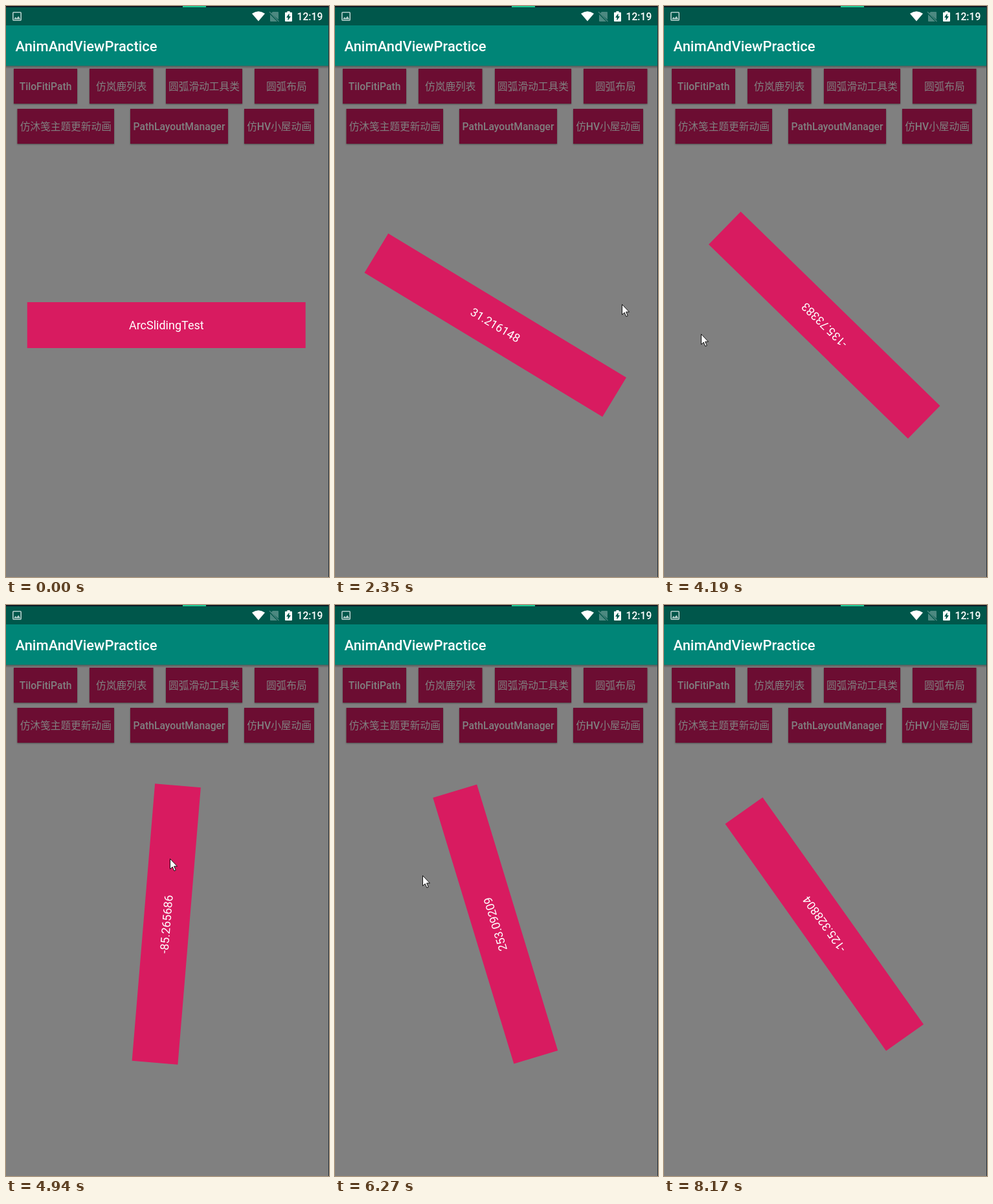
An HTML page that plays this animation: 499 by 883 pixels, repeating every 8.39 s.

```html
<!DOCTYPE html>
<html lang="zh">
<head>
<meta charset="utf-8">
<style>
html, body { margin: 0; width: 100%; height: 100%; overflow: hidden; background: #808080; }
svg { display: block; width: 499px; height: 883px; font-family: Roboto, "Noto Sans CJK SC", "Noto Sans CJK", sans-serif; }
.medium { font-weight: 500; }
#buttons text { font-size: 15.7px; fill: #808080; text-anchor: middle; }
</style>
</head>
<body>
<svg viewBox="0 0 499 883">
  <defs>
    <linearGradient id="fade" x2="0" y2="1">
      <stop stop-color="#000" stop-opacity=".34"/>
      <stop offset="1" stop-color="#000" stop-opacity="0"/>
    </linearGradient>
    <filter id="soft" x="-10%" y="-10%" width="120%" height="125%">
      <feDropShadow dx="0" dy="1" stdDeviation="1" flood-opacity=".4"/>
    </filter>
  </defs>
  <rect width="499" height="883" fill="#808080"/>
  <rect y="92" width="498" height="5" fill="url(#fade)"/>
  <rect y="30" width="498" height="62.5" fill="#008577"/>
  <rect width="498" height="30" fill="#00574b"/>
  <rect width="499" height="2" fill="#0c1a24"/>
  <rect x="273" width="36" height="2" fill="#1fc994"/>
  <rect x="498" width="1" height="883" fill="#26313a"/>

  <g fill="#b5cfcb">
    <rect x="10.8" y="9.8" width="12.4" height="12.4" rx="1.2" fill="none" stroke="#b5cfcb" stroke-width="1.6"/>
    <path d="M12 20.5l2.6-3.6 2 2.2 2.6-3.4 3.1 4.8z"/>
  </g>
  <path d="M390 23.5L380 11.8Q390 4.5 400 11.8Z" fill="#fff"/>
  <g fill="#4d8981">
    <path d="M412 9h8q1 0 1 1v11L409.500 11.500zM408 13l11 11h-10q-1 0-1-1z"/>
    <path d="M407 9l14.500 15" stroke="#4d8981" stroke-width="1.300"/>
  </g>
  <path d="M434.500 8h4v1.800h2.500q1 0 1 1V23q0 1-1 1h-9q-1 0-1-1V10.800q0-1 1-1h2.500z" fill="#fff"/>
  <path d="M437.500 11.500v4.500h2.500l-4.500 6.500v-4.800H433z" fill="#00574b"/>
  <text class="medium" x="449.500" y="21.800" font-size="15.700" fill="#fff">12:19</text>
  <text class="medium" x="14.500" y="70" font-size="22" fill="#fff">AnimAndViewPractice</text>

  <g id="buttons"></g>

  <g id="bar">
    <rect x="-215" y="-35.500" width="430" height="71" fill="#d81b60"/>
    <text id="label" y="6.300" font-size="18" fill="#fff" text-anchor="middle"></text>
  </g>
  <path id="cursor" d="M.5.5v15.800l3.700-3.300 2.700 6.200 2.400-1.100-2.700-6h4.900z" fill="#fff" stroke="#111" stroke-width="1"/>
</svg>
<script>
const LOOP = 8390, HIDE = 8170;
const $ = id => document.getElementById(id);

// x, y, width, label
const buttons = [
  [12, 97, 98, 'TiloFitiPath'], [129, 97, 98.5, '仿岚鹿列表'],
  [247, 97, 118, '圆弧滑动工具类'], [384, 97, 98.5, '圆弧布局'],
  [17.5, 159, 149.500, '仿沐笺主题更新动画'], [192, 159, 151, 'PathLayoutManager'],
  [368, 159, 108, '仿HV小屋动画']
];
$('buttons').innerHTML = buttons.map(([x, y, w, name]) => {
  const text = name.replace(/[A-Za-z]+/g, '<tspan class="medium">$&</tspan>');
  return `<rect x="${x}" y="${y}" width="${w}" height="54" fill="#6c0e30" filter="url(#soft)"/>
    <text x="${x + w / 2}" y="${y + 33}">${text}</text>`;
}).join('');

// Spans of screen updates: start, end, number of steps
const spans = [
  [370, 1200, 15], [1250, 2070, 15], [2130, 2640, 10], [2820, 3620, 15], [3680, 4480, 15],
  [4530, 5350, 15], [5400, 6210, 14], [6270, 6270, 1], [6510, 7320, 15], [7380, 8170, 15]
];

// time, bar angle
const turn = [
  [1200, 0], [1600, -39.358925], [1830, -45], [2070, -30], [2640, 78], [2820, 79],
  [3000, 98], [3220, 72.57853], [3620, -66], [4190, -135.73383], [4480, -168],
  [4940, -85.265686], [5350, 97], [5400, 107], [6270, 253.09209], [6450, 253.09209],
  [7320, -107], [7600, -129], [7740, -125.328804]
];

// time, pointer angle and distance from the centre
const pointer = [
  [370, -158.5, 41], [700, -70.5, 150], [1200, -39.4, 197], [1600, -78.8, 241.6],
  [1830, -84, 256], [2070, -70, 240], [2640, 50, 170], [2820, 62, 190], [3000, 88, 271],
  [3220, 63.6, 186], [3620, -84, 237], [3720, -102, 252], [4190, -183.9, 191.4],
  [4480, -215, 190], [4940, -87.2, 102.1], [5350, 90, 259], [5400, 97, 261],
  [5800, 160, 200], [6210, 213.6, 135.6], [6450, 213.6, 135.6], [7320, -130, 140],
  [7740, -165, 150], [7900, -235, 160], [8170, -298, 461]
];

function snap(t) {
  let out = 0;
  for (const [start, end, n] of spans) {
    if (t < start) break;
    const step = (end - start) / (n - 1) || 1;
    const k = Math.min(n - 1, Math.floor((t - start) / step + 0.1));
    out = Math.round((start + k * step) / 10) * 10;
  }
  return out;
}

// Smooth curve through the keys without overshoot
function curve(keys, t, c = 1) {
  const last = keys.length - 1;
  if (t <= keys[0][0]) return keys[0][c];
  if (t >= keys[last][0]) return keys[last][c];
  const i = keys.findIndex(k => k[0] > t) - 1;
  const slope = j => j < 0 || j >= last ? 0 : (keys[j + 1][c] - keys[j][c]) / (keys[j + 1][0] - keys[j][0]);
  const tangent = j => {
    const a = slope(j - 1), b = slope(j);
    return a * b > 0 ? 2 * a * b / (a + b) : 0;
  };
  const h = keys[i + 1][0] - keys[i][0], u = (t - keys[i][0]) / h, v = 1 - u;
  return v * v * (1 + 2 * u) * keys[i][c] + u * u * (3 - 2 * u) * keys[i + 1][c]
    + h * u * v * (v * tangent(i) - u * tangent(i + 1));
}

// Shortest decimal form of a 32-bit float
function floatText(x) {
  for (let p = 6; p < 9; p++) {
    const short = +x.toPrecision(p);
    if (Math.fround(short) === Math.fround(x)) return String(short);
  }
  return String(+x.toPrecision(9));
}

function draw(now) {
  const t = snap(now % LOOP), angle = curve(turn, t);
  $('bar').setAttribute('transform', `translate(247.75 493.5) rotate(${angle})`);
  $('label').textContent = t < 1250 ? 'ArcSlidingTest' : floatText(angle);
  const a = curve(pointer, t) * Math.PI / 180, r = curve(pointer, t, 2);
  const x = Math.round(248 + r * Math.cos(a)), y = Math.round(493.5 + r * Math.sin(a));
  $('cursor').setAttribute('transform', `translate(${x} ${y})`);
  $('cursor').setAttribute('visibility', t < 370 || t >= HIDE ? 'hidden' : 'visible');
}

const begin = performance.now();
function tick() {
  draw(performance.now() - begin);
  requestAnimationFrame(tick);
}
tick();
</script>
</body>
</html>
```
